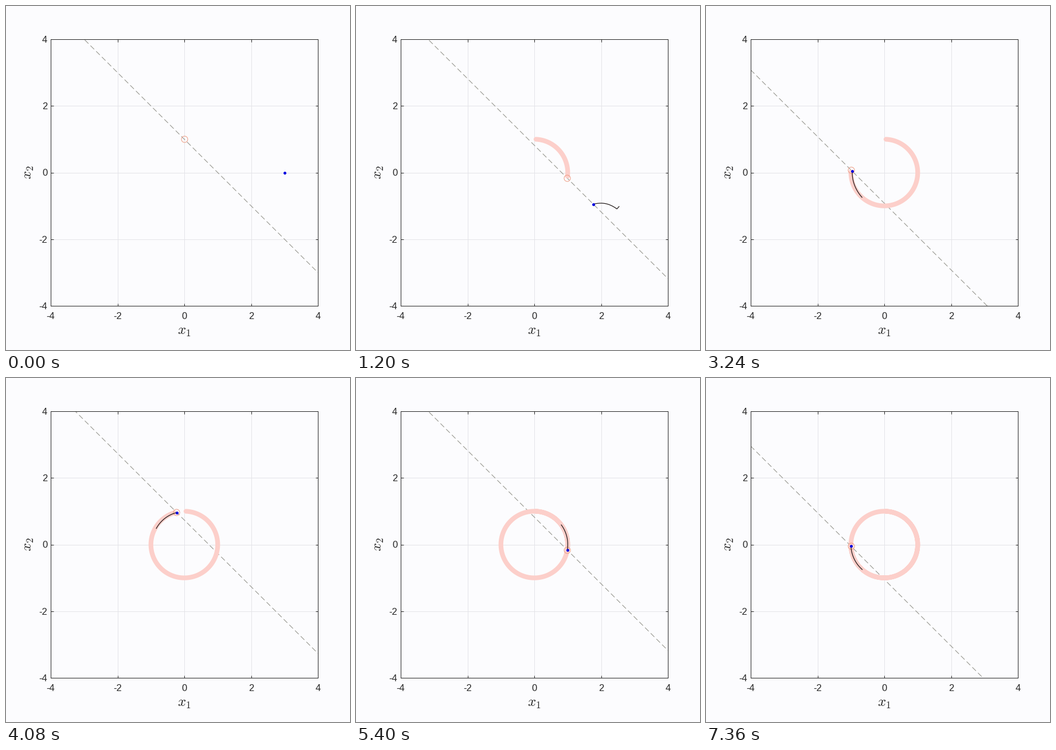
Recreate the animation shown at these times as a matplotlib script. Size 600x600 px, loop 7400 ms.

```python
import numpy as np
import matplotlib.pyplot as plt
from matplotlib.animation import FuncAnimation

FRAMES, STEP_MS = 185, 40
PX = 0.72  # points per pixel at 100 dpi
INK = "#262626"
PAPER = "#fcfcfe"
STEP = 0.0598  # simulated seconds per frame
MEMORY = 0.8  # length of the visible path, in simulated seconds

plt.rcParams["font.family"] = "Liberation Sans"
plt.rcParams["mathtext.fontset"] = "cm"


def clock(k):
    return max(0.0, STEP * k - 0.055)


def target(t):
    return np.sin(t), np.cos(t)


def state(t):
    """Double integrator: reaches the sliding line at t = 1, then stays on it."""
    t = np.asarray(t, dtype=float)
    decay = np.exp(-t)
    slide = (2 * np.e - 1) * decay
    reach = t < 1
    x1 = np.sin(t) + np.where(reach, 4 - 2 * t - decay, slide)
    x2 = np.cos(t) + np.where(reach, decay - 2, -slide)
    return x1, x2


fig = plt.figure(figsize=(6, 6), dpi=100, facecolor=PAPER)
ax = fig.add_axes([78 / 600, 77 / 600, 466 / 600, 465 / 600], facecolor=PAPER)
ax.set(xlim=(-4, 4), ylim=(-4, 4))
ticks = [-4, -2, 0, 2, 4]
names = [str(v) for v in ticks]
ax.set_xticks(ticks, names)
ax.set_yticks(ticks, names, va="center_baseline")
ax.tick_params(direction="in", top=True, right=True, length=4.5 * PX, width=PX,
               color=INK, labelcolor=INK, labelsize=16.5 * PX)
ax.tick_params(axis="x", pad=11 * PX)
ax.tick_params(axis="y", pad=6 * PX)
for spine in ax.spines.values():
    spine.set(color=INK, linewidth=PX)
ax.set_axisbelow(True)
ax.grid(color="#e4e4e8", lw=PX, ls="-")

label = dict(fontsize=25 * PX, color=INK, ha="center", va="baseline",
             rotation_mode="anchor")
fig.text(311 / 600, 27 / 600, "$x_1$", **label)
fig.text(44.5 / 600, 310 / 600, "$x_2$", rotation=90, **label)

surface, = ax.plot([], [], color="#8c8c84", lw=PX, dashes=(9, 5), zorder=2)
band, = ax.plot([], [], color="#fccfca", lw=8.2 * PX,
                solid_capstyle="round", zorder=3)
ring, = ax.plot([], [], "o", ms=11 * PX, mfc="none", mec="#ee9c84",
                mew=PX, zorder=4)
path, = ax.plot([], [], color="#1c1414", lw=1.2 * PX, zorder=5)
dot, = ax.plot([], [], "o", ms=5 * PX, color="#0000e0", mew=0, zorder=6)


def draw(k):
    t = clock(k)
    c = sum(target(t))
    surface.set_data([-4, 4], [c + 4, c - 4])
    # The band holds the earlier positions, without the current one.
    seen = np.linspace(0.05, t - STEP, 4 * k) if k > 2 else np.array([])
    band.set_data(*target(seen))
    tx, ty = target(t)
    ring.set_data([tx], [ty])
    path.set_data(*state(np.linspace(max(0, t - MEMORY), t, 81)))
    x1, x2 = state(t)
    dot.set_data([x1], [x2])
    return surface, band, ring, path, dot


anim = FuncAnimation(fig, draw, frames=FRAMES, interval=STEP_MS,
                     repeat=True, repeat_delay=0, blit=False)
plt.show()
```
